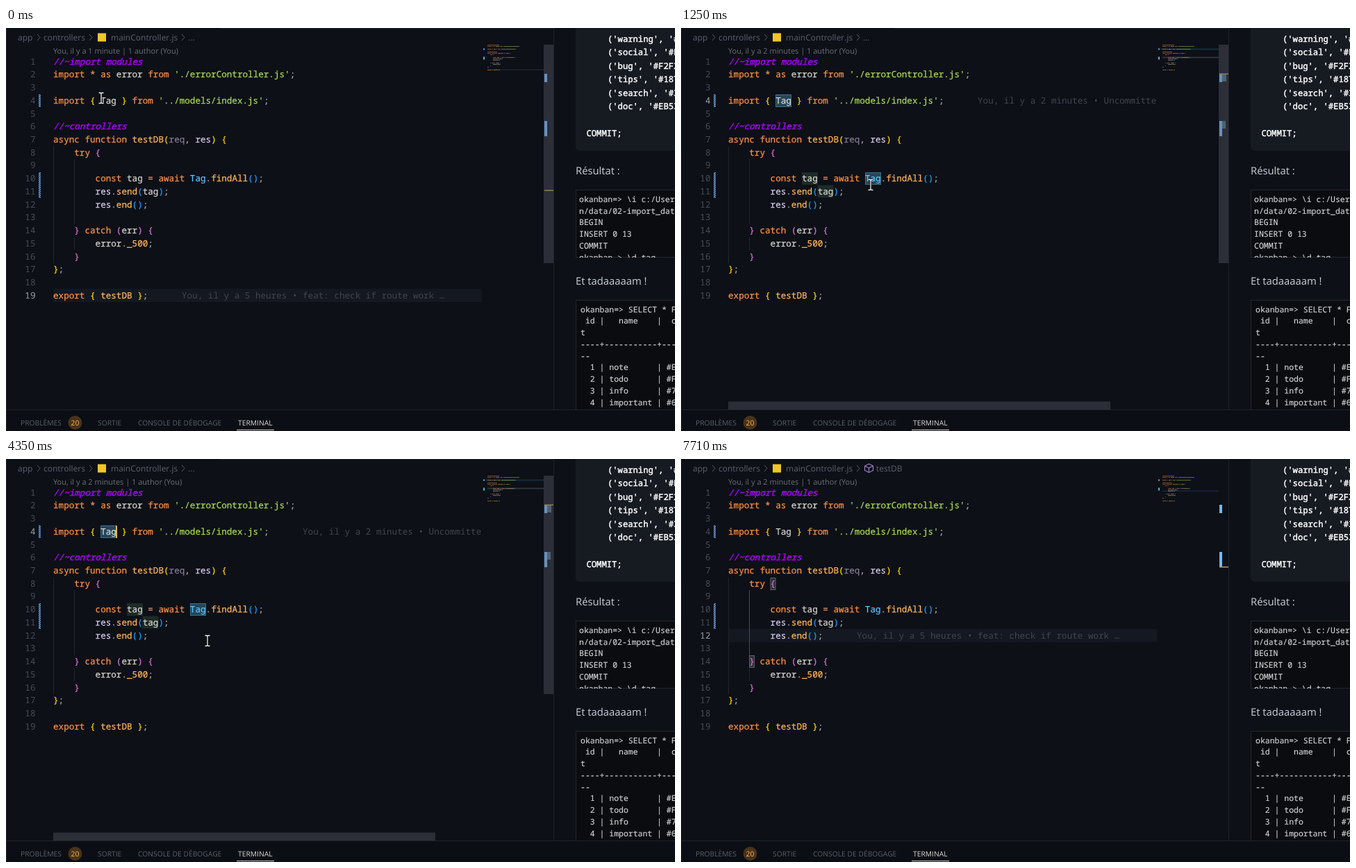
Write an HTML page that moves like this. It is 963 px wide and 581 px high and loops after 8 s.

```html
<!DOCTYPE html>
<html lang="fr">
<head>
<meta charset="utf-8">
<title>Code editor</title>
<style>
html, body { margin: 0; width: 100%; height: 100%; overflow: hidden; background: #0d1017; }
svg { display: block; text-rendering: geometricPrecision; }
text { white-space: pre; font-family: "Open Sans", "Noto Sans", sans-serif; color: #5a606b; fill: currentColor; }
.mono text { font-family: "Noto Sans Mono", "DejaVu Sans Mono", monospace; stroke: currentColor; stroke-width: .25; }
.code text { font-size: 12.62px; }
.code .num { color: #454b56; text-anchor: end; stroke: none; }
.code .ghost { color: #40454e; stroke: none; }
.code .now { color: #8f9190; text-anchor: end; stroke: none; }
.code .comment { font-style: italic; stroke-width: .45; }
.sql text { font-size: 12.2px; color: #fff; stroke-width: .45; }
.term text { font-size: 11.47px; color: #d2d3d4; stroke-width: .15; }
.head { font-size: 14.8px; color: #c9d1d9; }
.crumb { font-size: 12px; }
.lens { font-size: 11px; color: #6a6e76; }
.tab { font-size: 10.3px; }
.match { fill: #1d2b26; }
.sym { fill: #24465a; stroke: #3f6d80; }
.pair { fill: #2c3039; stroke: #5a5f69; }

.line19, .line4, .symbols, .line12, .before12, .min1, .min2, .matches, .pick,
.caret4, .caret12, .mouse, .slider { animation: 8s step-end infinite; }
.line19 { animation-name: line19; }
.line4 { animation-name: line4; }
.matches { animation-name: matches; }
.symbols { animation-name: symbols; }
.line12 { animation-name: line12; }
.before12 { animation-name: before12; }
.min1 { animation-name: min1; }
.min2 { animation-name: min2; }
.pick { animation-name: pick; transform-origin: 136px 0; }
.caret4 { animation-name: caret4; }
.caret12 { animation-name: caret12; }
.mouse { animation-name: mouse; }
.slider { animation-name: slider; }

@keyframes line19 { 0% { visibility: visible } 1.5%, 100% { visibility: hidden } }
@keyframes line4 { 0%, 56.25%, 100% { visibility: hidden } 1.5% { visibility: visible } }
@keyframes matches { 0%, 56.25%, 100% { visibility: hidden } 5.375% { visibility: visible } }
@keyframes symbols { 0%, 56.25%, 100% { visibility: hidden } 8.625% { visibility: visible } }
@keyframes line12 { 0% { visibility: hidden } 56.25%, 100% { visibility: visible } }
@keyframes before12 { 0% { visibility: visible } 56.25%, 100% { visibility: hidden } }
@keyframes min1 { 0% { visibility: visible } 8.625%, 100% { visibility: hidden } }
@keyframes min2 { 0% { visibility: hidden } 8.625%, 100% { visibility: visible } }
@keyframes pick { 0% { transform: scaleX(0) } 3.125% { transform: scaleX(.667) } 5.375%, 100% { transform: none } }
@keyframes caret4 {
  0%, 24.375%, 36.625%, 49.25%, 56.25%, 100% { visibility: hidden }
  17.5%, 29.375%, 42%, 54.375% { visibility: visible }
}
@keyframes caret12 {
  0%, 61.875%, 72.625%, 85.375%, 96.375%, 100% { visibility: hidden }
  56.25%, 67.25%, 78.375%, 90.75% { visibility: visible }
}
@keyframes mouse {
  0% { transform: translate(137px, 101px) }
  3.125% { transform: translate(149px, 103px) }
  5.375% { transform: translate(158px, 104px) }
  8.625% { transform: translate(163px, 110px) }
  10.25% { transform: translate(196px, 146px) }
  12% { transform: translate(238px, 190px) }
  13.75% { transform: translate(265px, 217px) }
  15.625% { transform: translate(273px, 226px) }
  17.5% { transform: translate(280px, 243px) }
  19% { transform: translate(286px, 256px) }
  20.625% { transform: translate(290px, 262px) }
  60% { transform: translate(340px, 313px) }
  61.875% { transform: translate(408px, 380px) }
  64% { transform: translate(480px, 446px) }
  65.625% { transform: translate(540px, 493px) }
  67.25% { transform: translate(606px, 526px) }
  68.875% { transform: translate(602px, 532px) }
  76.5% { transform: translate(470px, 533px) }
  78.375% { transform: translate(328px, 531px); visibility: visible }
  80%, 100% { transform: translate(318px, 540px); visibility: hidden }
}
@keyframes slider {
  0% { opacity: 1 } 87.25% { opacity: .9 } 90.75% { opacity: .55 }
  94.5% { opacity: .18 } 96.375%, 100% { opacity: 0 }
}
</style>
</head>
<body>
<svg width="963" height="581" viewBox="0 0 963 581">
  <defs>
    <pattern id="hatch" width="3" height="3" patternUnits="userSpaceOnUse">
      <path d="M-1 1L1 -1M0 3L3 0M2 4L4 2" stroke="#6aa9e8" stroke-width="1.3"/>
    </pattern>
  </defs>
  <rect width="963" height="581" fill="#0d1017"/>

  <!-- breadcrumb -->
  <g class="crumb">
    <text x="17" y="17.5">app</text>
    <text x="54" y="17.5">controllers</text>
    <rect x="132" y="7.5" width="12" height="12" fill="#f0c52b"/>
    <text x="151" y="17.5">mainController.js</text>
    <path d="M45 9l4 4.5-4 4.5M120 9l4 4.5-4 4.5M253 9l4 4.5-4 4.5" fill="none" stroke="#565b66"/>
    <text class="before12" x="262" y="17.5">...</text>
    <g class="line12">
      <path d="M270.5 7l6 3v6.5l-6 3-6-3v-6.5zM264.5 10l6 3 6-3M270.5 13v6.5" fill="none" stroke="#a981d6" stroke-width="1.1"/>
      <text x="281" y="17.5">testDB</text>
    </g>
  </g>
  <text class="lens min1" x="68" y="36.5">You, il y a 1 minute | 1 author (You)</text>
  <text class="lens min2" x="68" y="36.5">You, il y a 2 minutes | 1 author (You)</text>

  <!-- code backgrounds -->
  <rect class="line19" x="68" y="376" width="617" height="19" fill="#141821"/>
  <rect class="line12" x="68" y="245" width="617" height="19" fill="#141821"/>
  <path d="M68.5 170.5V339M98.5 189V283M98.5 301.5V320" stroke="#20242c"/>
  <path class="line12" d="M98.5 189V283" stroke="#474c56"/>
  <g class="line4"><rect class="pick" x="136" y="95.5" width="23" height="18.5" fill="#26405f"/></g>
  <g class="matches">
    <rect class="match" x="174" y="208" width="23" height="18"/>
    <rect class="match" x="196.5" y="226.5" width="23" height="18"/>
    <rect class="match" x="265" y="208" width="23" height="18"/>
  </g>
  <g class="symbols">
    <rect class="sym" x="136.5" y="96.5" width="22" height="17"/>
    <rect class="sym" x="265.5" y="208.5" width="22" height="17"/>
  </g>
  <g class="line12">
    <rect class="pair" x="129" y="171.5" width="7" height="17"/>
    <rect class="pair" x="98.5" y="283.5" width="7" height="17"/>
  </g>
  <path d="M47 95.5h3v18.5h-3zM47 208h3v37h-3z" fill="url(#hatch)"/>

  <g class="mono code">
    <g id="code"></g>
    <text class="ghost line19" x="253" y="389.66">You, il y a 5 heures • feat: check if route work …</text>
    <text class="ghost line4" x="427" y="108.86">You, il y a 2 minutes • Uncommitte</text>
    <text class="ghost line12" x="253" y="258.62">You, il y a 5 heures • feat: check if route work …</text>
    <text class="now line19" x="42.5" y="389.66">19</text>
    <text class="now line4" x="42.5" y="108.86">4</text>
    <text class="now line12" x="42.5" y="258.62">12</text>
  </g>
  <rect class="caret4" x="158" y="96" width="2" height="18" fill="#e6b450"/>
  <rect class="caret12" x="204" y="245" width="2" height="19" fill="#e6b450"/>

  <!-- minimap -->
  <rect class="line19" x="693" y="59.5" width="81" height="1.5" fill="#20242c"/>
  <rect class="line4" x="690" y="29.5" width="84" height="2" fill="#142c3d"/>
  <rect class="symbols" x="693" y="41.5" width="81" height="2" fill="#2e333a"/>
  <rect class="line12" x="693" y="45.5" width="81" height="1.5" fill="#172840"/>
  <g id="minimap" opacity=".45"></g>
  <path d="M687 29.5h2v2h-2zM687 41.5h2v4h-2z" fill="#55b4d4"/>

  <!-- overview ruler and scrollbars -->
  <path d="M775 66h4v12h-4zM775 134h4v22h-4z" fill="#73b8ff"/>
  <path class="symbols" d="M779 67h6v10h-6zM779 134h5v11h-5z" fill="#4b6877"/>
  <g fill="#b8954e">
    <rect class="line19" x="775" y="233.5" width="13" height="1.5"/>
    <rect class="line4" x="775" y="65.5" width="13" height="1.5"/>
    <rect class="line12" x="775" y="155" width="13" height="1.5"/>
  </g>
  <rect class="slider" x="774" y="24" width="14" height="315" fill="#565b66" fill-opacity=".42"/>
  <g class="matches"><rect x="68" y="538.5" width="550" height="12" fill="#2b2e36"/></g>

  <!-- documentation column -->
  <path d="M820 0V171a6 6 0 0 0 6 6H963V0z" fill="#161b22"/>
  <g class="mono sql" id="sql"></g>
  <text class="head" x="820" y="210.5">Résultat :</text>
  <svg class="mono term" x="820" y="233" width="143" height="98">
    <rect x=".5" y=".5" width="160" height="97" fill="#0a0c10" stroke="#24272d"/>
    <g id="import"></g>
  </svg>
  <text class="head" x="820" y="370">Et tadaaaaam !</text>
  <svg class="mono term" x="820" y="392" width="143" height="158">
    <rect x=".5" y=".5" width="160" height="190" fill="#0a0c10" stroke="#24272d"/>
    <g id="select"></g>
  </svg>

  <!-- panel -->
  <rect y="551" width="963" height="30" fill="#0b0e14"/>
  <path d="M0 550.5H963M788.5 0V550M.5 0V581M308 .5H788" stroke="#1e232b"/>
  <text class="tab" x="21" y="573">PROBLÈMES</text>
  <circle cx="99.5" cy="569" r="10" fill="#49331a"/>
  <text class="tab" x="99.5" y="573" text-anchor="middle" style="color:#ffb454">20</text>
  <text class="tab" x="132" y="573">SORTIE</text>
  <text class="tab" x="190" y="573">CONSOLE DE DÉBOGAGE</text>
  <text class="tab" x="334" y="573" style="color:#dcdbd6">TERMINAL</text>
  <rect x="332" y="579" width="54" height="1" fill="#d0cfca"/>

  <g class="mouse" fill="none">
    <path d="M-3.5 -7.5H-1L0 -6.5 1 -7.5H3.5M0 -6.5V6.5M-3.5 7.5H-1L0 6.5 1 7.5H3.5" stroke="#000" stroke-width="2.6"/>
    <path d="M-3.5 -7.5H-1L0 -6.5 1 -7.5H3.5M0 -6.5V6.5M-3.5 7.5H-1L0 6.5 1 7.5H3.5" stroke="#f4f4f4" stroke-width="1.3"/>
  </g>
</svg>
<script>
const colors = {
  k: '#ff8f40', t: '#d6d4cd', s: '#aad94c', f: '#ffb454', e: '#59c2ff', o: '#f29668',
  y: '#ffd700', p: '#da70d6', b: '#179fff', d: '#a3a29d', v: '#d6c9ea', u: '#857a94', c: '#aa00ff'
};

// Each token starts with its color key.
const code = [
  "c//~import modules",
  "kimport |o* |kas |terror |kfrom |s'./errorController.js'|d;",
  "",
  "kimport |y{ |tTag |y} |kfrom |s'../models/index.js'|d;",
  "",
  "c//~controllers",
  "kasync |kfunction |ftestDB|y(|ureq|d, |vres|y) |y{",
  "t    |ktry |p{",
  "",
  "t        |kconst |ttag |o= |kawait |eTag|d.|ffindAll|b()|d;",
  "t        |vres|d.|fsend|b(|ttag|b)|d;",
  "t        |vres|d.|fend|b()|d;",
  "",
  "t    |p} |kcatch |p(|terr|p) |p{",
  "t        |terror|d.|f_500|d;",
  "t    |p}",
  "y}|d;",
  "",
  "kexport |y{ |ftestDB |y}|d;"
];

const byId = id => document.getElementById(id);

function add(parent, tag, attrs, content = '') {
  const node = document.createElementNS('http://www.w3.org/2000/svg', tag);
  for (const name in attrs) node.setAttribute(name, attrs[name]);
  node.textContent = content;
  return parent.appendChild(node);
}

function addLines(id, x, y, step, lines) {
  lines.forEach((line, i) => add(byId(id), 'text', { x, y: y + i * step }, line));
}

code.forEach((line, row) => {
  const y = 52.7 + row * 18.72;
  add(byId('code'), 'text', { x: 42.5, y, class: 'num' }, row + 1);
  let col = 0;
  for (const token of line.split('|').filter(Boolean)) {
    const content = token.slice(1), fill = colors[token[0]];
    if (content.trim()) {
      const type = token[0] === 'c' ? 'comment' : 'token';
      add(byId('code'), 'text', { x: 68 + col * 7.572, y, class: type, style: `color:${fill}` }, content);
      add(byId('minimap'), 'rect', {
        x: 693 + col, y: 24 + row * 2, width: content.trimEnd().length, height: 1.1,
        fill: type === 'comment' ? colors.k : fill
      });
    }
    col += content.length;
  }
});

addLines('sql', 866, 19.7, 19.5, [
  "('warning', '#F", "('social', '#F2", "('bug', '#F2F2", "('tips', '#187", "('search', '#3C", "('doc', '#EB53"
]);
addLines('sql', 835.5, 155.8, 0, ['COMMIT;']);
addLines('import', 5, 17.8, 16.75, [
  'okanban=> \\i c:/User', 'n/data/02-import_dat', 'BEGIN', 'INSERT 0 13', 'COMMIT', 'okanban-> \\d tag'
]);
addLines('select', 7, 17.6, 16.75, [
  'okanban=> SELECT * F', ' id |   name    |  c', 't', '----+-----------+---', '--',
  '  1 | note      | #E', '  2 | todo      | #F', '  3 | info      | #7', '  4 | important | #6'
]);
</script>
</body>
</html>
```
